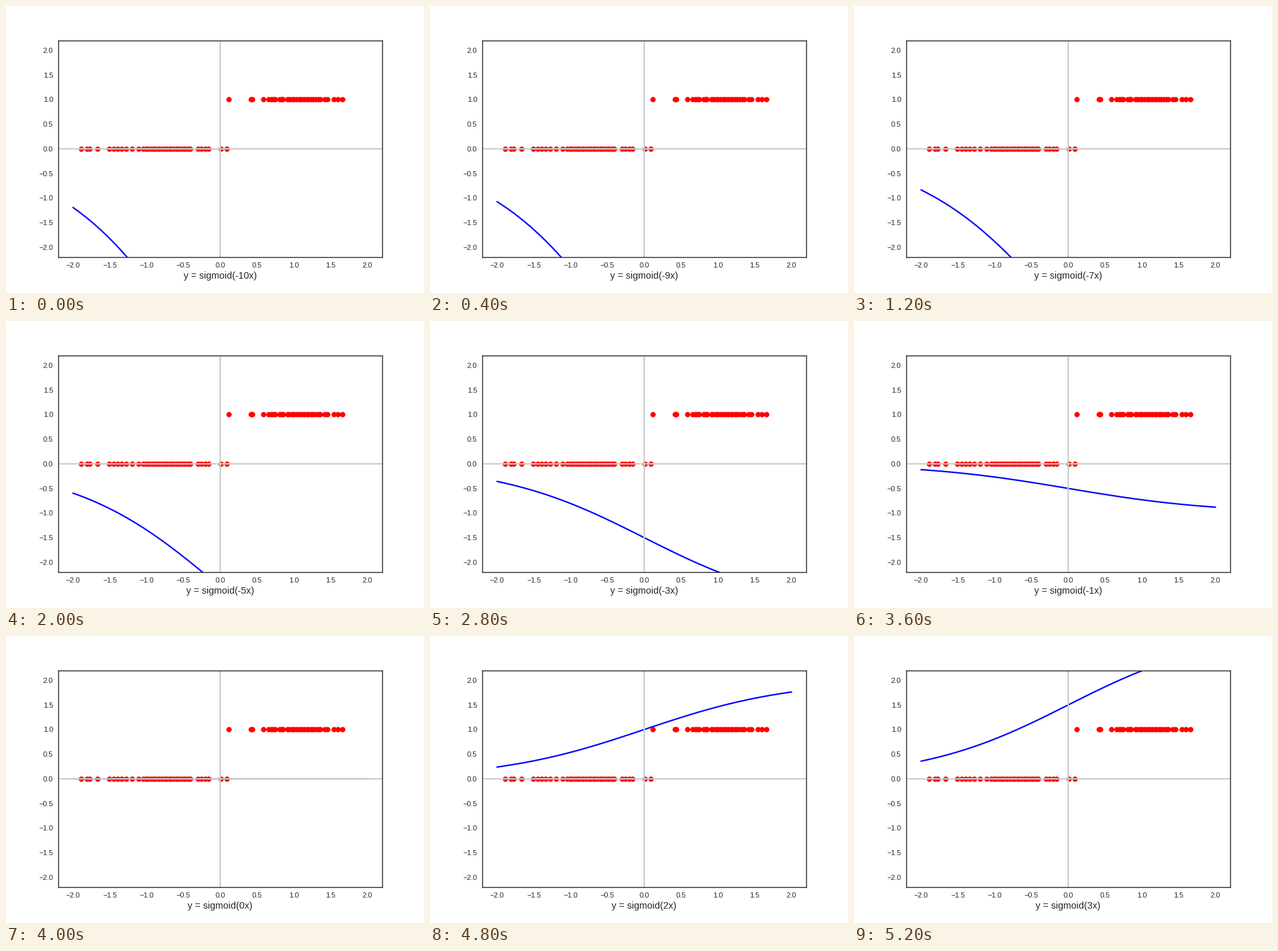
Write a matplotlib script that moves like this. It is 640 by 440 pixels and loops after 5.6 s.

```python
import numpy as np
import matplotlib.pyplot as plt
from matplotlib.animation import FuncAnimation

INK = "0.15"
WEIGHTS = range(-10, 4)

plt.rcParams.update({
    "font.family": "Liberation Sans",
    "axes.labelcolor": INK,
    "axes.edgecolor": INK,
    "axes.linewidth": 1.25,
    "lines.linewidth": 2,
    "lines.solid_capstyle": "round",
})
for axis in ("xtick", "ytick"):
    plt.rcParams.update({
        f"{axis}.color": INK,
        f"{axis}.labelsize": 10,
        f"{axis}.major.size": 0,
        f"{axis}.major.pad": 7,
    })


def sigmoid(x):
    return 1 / (1 + np.exp(-x))


def runs(*spans):
    """Join evenly spaced runs given as (start, stop, count)."""
    return np.concatenate([np.linspace(*span) for span in spans])


# Sparse tails around a dense middle for each class
zeros = runs((-1.89, -1.89, 1), (-1.81, -1.775, 2), (-1.665, -1.665, 1),
             (-1.505, -1.28, 5), (-1.195, -1.105, 2), (-1.045, -0.405, 21),
             (-0.3, -0.16, 4), (0.013, 0.09, 2))
ones = runs((0.117, 0.117, 1), (0.42, 0.435, 2), (0.583, 0.583, 1),
            (0.66, 0.745, 4), (0.81, 0.85, 3), (0.91, 1.36, 15),
            (1.42, 1.455, 2), (1.54, 1.66, 3))

fig, ax = plt.subplots(figsize=(8, 5.5), dpi=80, facecolor="white")
fig.subplots_adjust(left=0.125, right=0.9, bottom=0.125, top=0.88)

for label, pts in enumerate((zeros, ones)):
    ax.scatter(pts, np.full(len(pts), label), s=49, c="red", linewidths=0.3)

xs = np.linspace(-2, 2, 100)
curve, = ax.plot(xs, np.zeros_like(xs), color="blue")
ax.axhline(0, color="0.8")
ax.axvline(0, color="0.8")

ticks = np.arange(-2, 2.1, 0.5)
ax.set(xlim=(-2.2, 2.2), ylim=(-2.2, 2.2), xticks=ticks, yticks=ticks)
xlabel = ax.set_xlabel("", fontsize=13, labelpad=4)


def update(w):
    curve.set_ydata(w * sigmoid(xs))
    xlabel.set_text(f"y = sigmoid({w}x)")
    return curve, xlabel


anim = FuncAnimation(fig, update, frames=WEIGHTS, interval=400, repeat=True,
                     repeat_delay=0)
plt.show()
```
